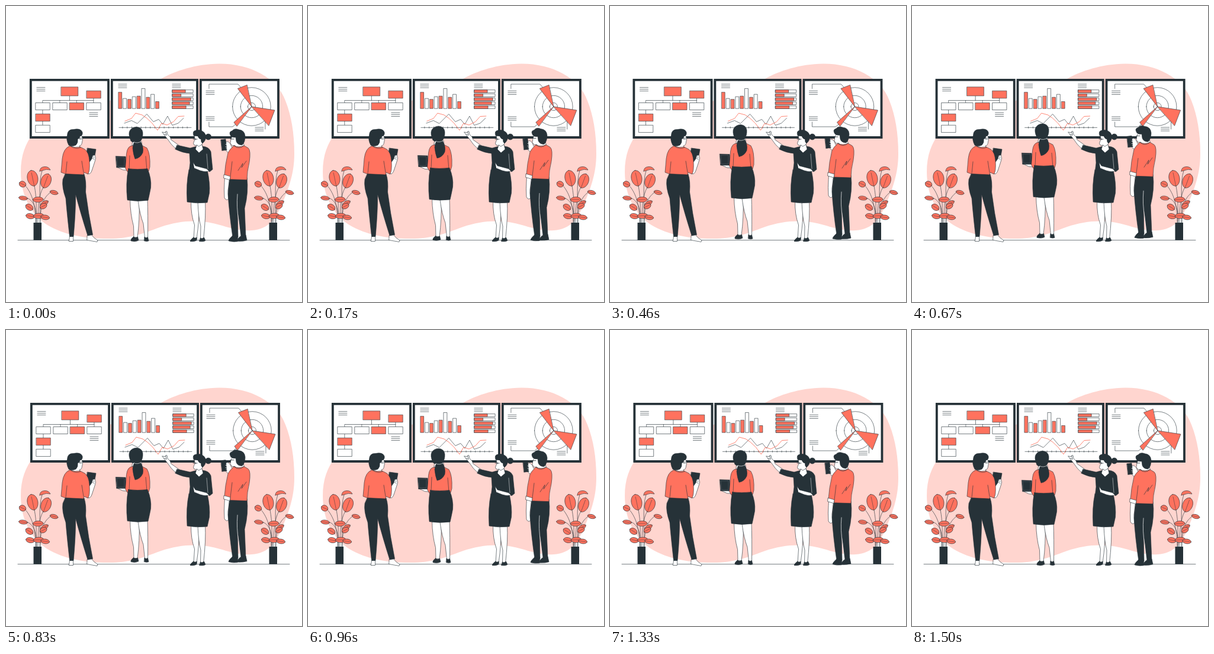
These frames come from a looping animation (500 px wide and 500 px high, 1.54 s). An HTML page with a canvas:

```html
<!DOCTYPE html>
<html lang="en">
<head>
<meta charset="utf-8">
<title>Team at the dashboards</title>
<style>
html, body { margin: 0; width: 100%; height: 100%; overflow: hidden; background: #fff; }
canvas { display: block; width: 100vw; height: 100vh; }
</style>
</head>
<body>
<canvas id="stage"></canvas>
<script>
const DARK = '#263238', CORAL = '#ff725e', PINK = '#ffd5cf', WHITE = '#fff';
const LOOP = 1540, PERIOD = 1500, STEP = 1000 / 24, LEAD = 20;
const LIFT = 6.25;
const SHAKE = [0, -1, 2, -4, 4, -4, 4, -4, 2, -1, 0];

const canvas = document.getElementById('stage');
const ctx = canvas.getContext('2d');
const ratio = window.devicePixelRatio || 1;
canvas.width = canvas.height = 500 * ratio;
ctx.scale(ratio, ratio);
ctx.lineJoin = ctx.lineCap = 'round';

function shape(d, fill, stroke = DARK, width = 0.62) {
  const path = new Path2D(d);
  if (fill) { ctx.fillStyle = fill; ctx.fill(path); }
  if (stroke) { ctx.strokeStyle = stroke; ctx.lineWidth = width; ctx.stroke(path); }
}
const line = (d, color = DARK, width = 0.62) => shape(d, null, color, width);
const box = (x, y, w, h, fill, stroke) => shape(`M${x} ${y}h${w}v${h}h${-w}Z`, fill, stroke);

function disc(x, y, r, fill, stroke) {
  shape(`M${x - r} ${y}a${r} ${r} 0 1 0 ${2 * r} 0a${r} ${r} 0 1 0 ${-2 * r} 0Z`, fill, stroke);
}

function shifted(x, y, draw) {
  ctx.save();
  ctx.translate(x, y);
  draw();
  ctx.restore();
}

function note(x, y) {
  for (let i = 0; i < 3; i++) line(`M${x} ${y + 3 * i}h14`);
}

function backdrop() {
  shape('M46 215C33 232 25 252 25 280C25 320 42 352 70 370C100 388 140 394 180 393' +
    'C215 392 240 381 262 373C285 365 308 362 332 364C362 367 385 381 415 379' +
    'C445 377 455 358 464 340C476 312 487 285 487 250C487 215 482 185 472 160' +
    'C458 120 410 97 360 97.5C320 98 285 110 262 123Z', PINK, null);
}

function orgChart() {
  note(52, 137.5);
  line('M107.5 152v7.5M62 163.5v-4H148M91 159.5v4M119.5 159.5v4M148 156v7.5M62 175v27');
  box(93.3, 136.8, 28.5, 15, CORAL);
  box(136.3, 143.3, 24, 12.5, CORAL);
  [50.3, 79.3, 107.5, 136.3].forEach((x, i) => box(x, 163.5, 24, 12, i === 2 ? CORAL : WHITE));
  box(50.3, 182.3, 24, 12.3, CORAL);
  box(50.3, 201.3, 24, 12.3, WHITE);
  note(141, 180.5);
}

function charts() {
  note(190, 132);
  note(281, 132);
  [27.5, 17, 15.5, 20, 21, 33.8, 19, 24, 11.7].forEach((h, i) =>
    box(190.2 + 7.85 * i, 173.2 - h, 5.5, h, i % 2 ? WHITE : CORAL));
  [22, 14.5, 31, 29, 23].forEach((w, i) => {
    const y = 141.7 + 6.75 * i;
    box(281.2, y, 35, 4.6, WHITE);
    box(281.2, y, w, 4.6, CORAL);
  });
  line('M191 205.3H313');
  for (let x = 197; x < 312; x += 7.8) line(`M${x} 204v2.4`);
  line('M200 198L212 193.5L222 198.5L238 182.5L249 195.5L258 191.5L265 200L273 186L281 201.5L291 198L300 189.5');
  line('M201 194.5L212 190L219 181L230 184L238 189.5L247 198L256 210L263 198L272 201L283 195.5L291 186.5L301 186', CORAL, 0.85);
}

function radial() {
  line('M343 139.5V132H392L398 139M343 196V204H383L392 196M438 194V208');
  note(338, 143.5);
  note(338, 187);
  note(421, 205);
  [32.3, 18.7, 6.5].forEach(r => disc(415, 170, r, WHITE));
  ['M415 170L391.5 139.5L407 133.5Z', 'M415 170L454 176L444 202Z', 'M415 170L385 196.5L390 203Z']
    .forEach(d => shape(d, CORAL));
}

function screens() {
  [[40, 135], [177, 148], [327, 135]].forEach(([x, w]) => {
    box(x, 123, w, 101, DARK, null);
    box(x + 3.8, 126.8, w - 7.6, 93.2, WHITE, null);
  });
  orgChart();
  charts();
  radial();
}

function leaf(x, y, length, width, degrees) {
  ctx.save();
  ctx.translate(x, y);
  ctx.rotate(degrees * Math.PI / 180);
  const l = length / 2, w = width * 0.66;
  shape(`M0 ${-l}C${w} ${-l * 0.9} ${w} ${l * 0.8} 0 ${l}C${-w} ${l * 0.8} ${-w} ${-l * 0.9} 0 ${-l}Z`, CORAL);
  line(`M0 ${-l * 0.7}V${l}`, DARK, 0.45);
  ctx.restore();
}

function plant() {
  line('M51 366C51 340 52 325 48 304M54 366C54 340 55 320 63 306M57 366C59 330 54 300 61 278');
  line('M50 366C50 335 44 318 34 305M58 366C58 340 62 324 75 315M52 366C52 340 46 328 35 324');
  shape('M57 279Q57 272 65 271.5Q72 271 75 277Q68 275 63 277.5Q59 279 57 279Z', CORAL);
  [[45, 291, 27, 18, -12], [67.5, 295.5, 25, 17, 20], [28, 301, 12, 10, -65],
   [81, 315, 14, 7, 105], [29, 324.5, 15, 7, -82], [54, 327, 18, 9, 88],
   [65, 333, 14, 7, 62], [39.5, 340, 14, 10, -58], [63, 338, 13, 9, 62],
   [41, 355, 15, 9, -80], [55, 354.5, 18, 9, 88], [66, 357, 15, 8, 98]]
    .forEach(args => leaf(...args));
  box(46.5, 366, 13.5, 29.5, DARK, null);
}

function tabletPerson() {
  shape('M108 389H113.5V397.5H106.5Z', WHITE);
  shape('M137.5 387L144 386Q148 392 155 396L154 398.5L137 395.5Z', WHITE);
  shape('M101 282L132 284Q136 296 134.5 314Q139 350 146.5 386.5L138 388Q126 350 117.5 318Q118 345 114 389.5L107.5 389.5Q103 350 101 325Q94 306 96 293Z', DARK);
  shape('M111 230V238Q118 242 125 239L124 236Q128 236 128.5 230L129.5 225L128 219L118 218Z', WHITE);
  shape('M106 235Q101 226 103.5 218Q104 208 114 208.5Q126 206 129 213Q130 219 125 220Q124 224 121 225Q122 231 118 235Q111 238 106 235Z', DARK);
  line('M119 223H128M124 222v3h4');
  shape('M137.5 240L152 242L148 264.5L134.5 262Z', DARK);
  shape('M136 282Q142 287 145 278L150 263Q153 257 150 251.5L146 253L145 258L140 265Z', WHITE);
  line('M146 254l3 2M146 257l3 2');
  shape('M108 236.5Q97 240 95 258L93 281L100 283.5L131 285L132 281L138.5 284Q142 279 141 262Q140 247 133 242L125 238Q116 240 108 236.5Z', CORAL);
  line('M101 283L103 263M131 281L128 262M109 237Q118 243 126 239');
}

function laptopPerson() {
  shape('M209.5 327Q210 352 215.5 372L216 391H222Q226 362 225 329Z', WHITE);
  shape('M223 329Q226 352 232 368L234.5 392H239.5Q240 350 239 327Z', WHITE);
  shape('M215.5 390Q219 393 222.5 390L224 396Q219 399 211 397Q210 394 215.5 390Z', DARK);
  shape('M234 390.5Q237 393 239.5 390.5L241 397Q238 398.5 233.5 397Z', DARK);
  shape('M187 272Q195 272 204 270V277.5Q197 278 193 275Z', WHITE);
  shape('M185.5 254L202 254.5L203 273H187Z', DARK);
  line('M187.5 256H200V271H188.5Z', '#58636a', 0.5);
  shape('M214 229H229L230 238Q222 243 213 238Z', WHITE);
  shape('M214 236Q205 236 203.5 250L201.5 274L205 280L241 279L243 272Q244 250 238 240L230 236Q222 241 214 236Z', CORAL);
  line('M208 276L209 253M238 278L236 254');
  shape('M206.5 275Q222 277 239 275Q246 292 244.5 307Q242 320 240 328.5Q222 331 205 328Q202 300 206.5 275Z', DARK);
  shape('M211 228Q206 217 209 211Q213 204.5 221 204.5Q230 205.5 231 214Q231.5 223 227 229Q233 238 231 248Q227 257 218 258.5Q215 251 214 240Q215 232 217 230Q213 231 211 228Z', DARK);
  line('M216 230Q222 233 228 229', WHITE, 0.6);
}

function pointingPerson() {
  shape('M312.5 329Q312 352 318.5 370L317 393H322Q327 360 326 331Z', WHITE);
  shape('M324 331Q325 358 329 372L328.5 394H333.5Q338 355 336.5 329Z', WHITE);
  shape('M316.5 391Q319 393 322.5 391L322 396Q318 398.5 311 397.5Q311 395 316.5 391Z', DARK);
  shape('M328.5 392Q331 394 334.5 391L337 396Q335 398.5 326.5 397.5Z', DARK);
  shape('M264 213L269 214L270 211.5L272 212L273 217Q278 221 279 226L293 236L289 243Q279 235 273 225L269 220Z', WHITE);
  line('M270 213l1 5M267 217l4 1');
  shape('M318 218L319 225L316.5 232L318 235L324 236V244L320 252L334 247L331 234L334 222Z', WHITE);
  shape('M289 235L311 240L322 237L326 248L332 237Q343 238 346 246L349 276L344 280L339 277L309 282L311 265L310 249Q298 248 286 242Z', DARK);
  shape('M322 235L320 242L326 248L333 242L331 234L326 237Z', WHITE);
  shape('M309 277Q325 281 340 277Q345 300 343.5 316L340 332Q322 334 306 331Q304 300 309 277Z', DARK);
  shape('M316 264L320 270L339 275L343 279Q336 281 328 278L318 274Z', WHITE);
  line('M339 250L341 275', WHITE, 0.5);
  shape('M317 219Q314 211 321 210Q329 208 335 214L338 219Q338 227 332 232Q329 230 329.5 225Q326 225 324 220Z', DARK);
  disc(341.7, 221, 5, DARK);
  line('M316 225h7M320 224v2', DARK, 0.8);
}

function phonePerson() {
  shape('M370 286L378 290L375 312L376 326Q372 330 369 324Q368 310 369 298Z', WHITE);
  shape('M384 387L392 389L391 398Q383 399 376 397Q376 394 384 387Z', DARK);
  shape('M397 388L405 387L407 396Q401 398 391 397.5Q390 394 397 388Z', DARK);
  shape('M378 290L407 290Q410 315 403 342L405 390L397 391L391 345L392 390L383 391Q377 350 375 318Z', DARK);
  line('M391 318Q389 340 393 362L396 389', WHITE, 0.7);
  shape('M383 218L380 225L379 232L382 236L387 236V243L403 240L400 225Z', WHITE);
  shape('M380 220Q375 213 382 211Q386 206 393 209Q403 210 404 220Q404 230 399 235Q391 235 389 229L388 222Q383 223 380 220Z', DARK);
  line('M379 225h6', DARK, 0.8);
  shape('M371 230L375 229L379 233L381 238L386 242L378 250L371 244Z', WHITE);
  shape('M363 226L371 225L373 243.5L365 244.5Z', DARK);
  line('M371 234l3 1M371 238l3 1M372 241l3 1', WHITE, 0.8);
  shape('M385 236Q378 242 375 248L371 268L369 287L379 290L378 293L407 294Q407 280 411 264Q414 244 409 240L402 236Q393 240 385 236Z', CORAL);
  shape('M368.5 285L379 288L378 294L368 291Z', WHITE);
  line('M379 288L382 263M406 262L398 273L400 266L392 278M386 237Q394 243 402 236');
}

function render(time) {
  const tick = Math.floor((time % LOOP + 5) / STEP);
  const phase = (tick * STEP + LEAD) / PERIOD % 1;
  const key = Math.floor(phase * 10), part = phase * 10 - key;
  const sway = (SHAKE[key] + (SHAKE[key + 1] - SHAKE[key]) * part) * LIFT / 10;
  const rise = -LIFT * (1 - Math.abs(1 - 2 * phase));

  ctx.fillStyle = WHITE;
  ctx.fillRect(0, 0, 500, 500);
  backdrop();
  line('M20 395.5H479');
  shifted(sway, 0, screens);
  plant();
  shifted(398, 0, plant);
  tabletPerson();
  shifted(0, rise, laptopPerson);
  pointingPerson();
  shifted(0, rise, phonePerson);
}

const start = performance.now();
function loop() {
  render(performance.now() - start);
  requestAnimationFrame(loop);
}
loop();
</script>
</body>
</html>
```
